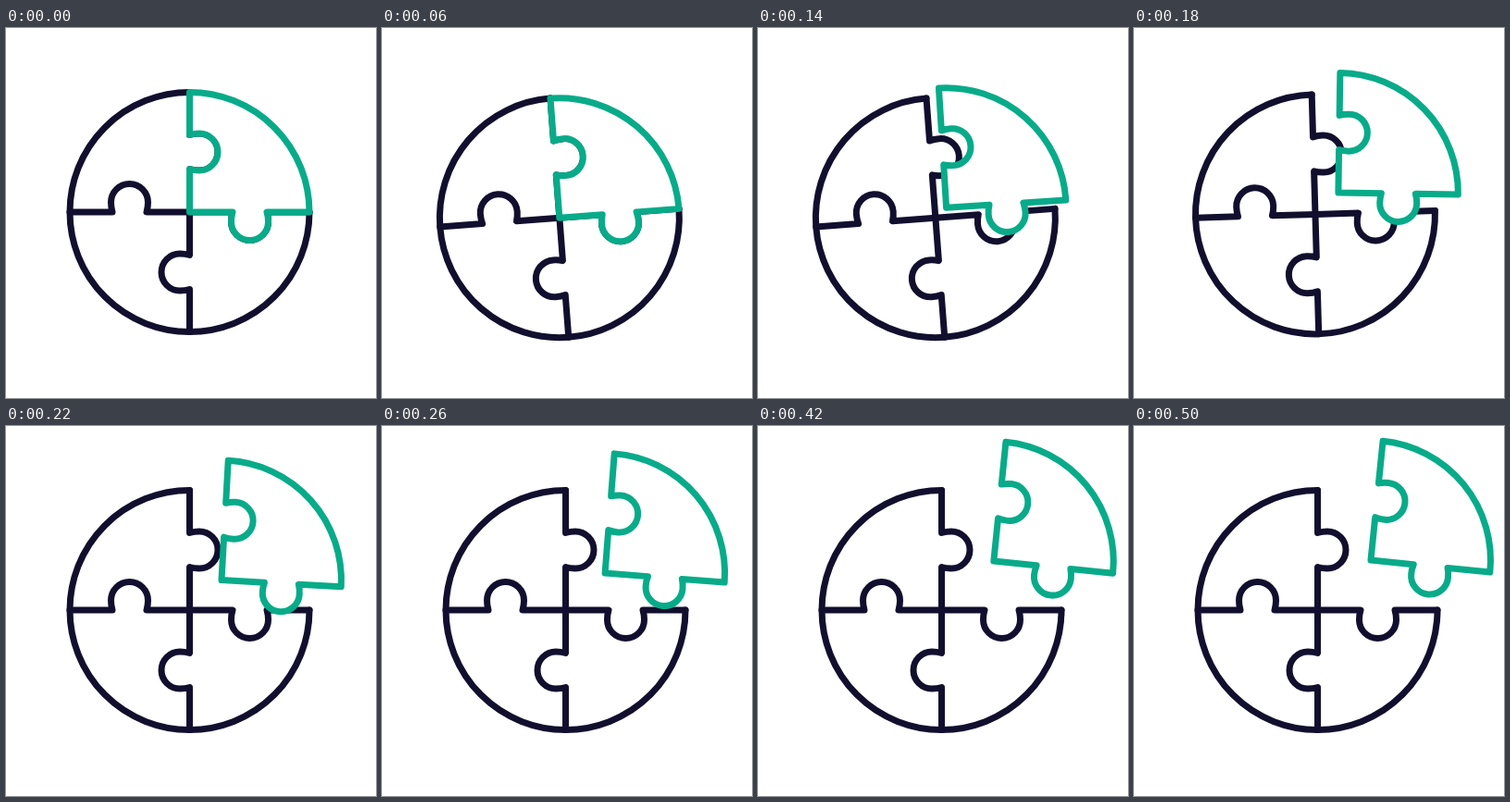
Recreate the animation shown at these times as an HTML page. Size 400x400 px, loop 8 s.

```html
<!DOCTYPE html>
<html lang="en">
<head>
<meta charset="utf-8">
<title>Puzzle circle</title>
<style>
  html, body { margin: 0; height: 100%; overflow: hidden; background: #fff; }
  svg { display: block; width: 100%; height: 100%; }
  path { stroke-width: 7; stroke-linecap: round; stroke-linejoin: round; }
  #base path { fill: none; stroke: #120f2e; }
  #piece { fill: #fff; stroke: #08ab89; }
</style>
</head>
<body>
<svg viewBox="0 0 400 400">
  <g id="base">
    <path d="M129.5 0A129.5 129.5 0 1 1 0 -129.5"/>
    <path class="spoke"/>
    <path class="spoke" transform="rotate(90)"/>
    <path class="spoke" transform="rotate(180)"/>
    <path class="spoke" transform="rotate(270)"/>
  </g>
  <path id="piece"/>
</svg>
<script>
const LOOP = 8000, STEP = 20;
const RECOIL = 200, RELEASE = 100, FLIGHT = 400, TURN = 300;
const CENTER = { x: 198.5, y: 199 };
const PULLED = { x: -8.2, y: 7.7, angle: -5.4 };
const FREE = { x: 57.5, y: -54, angle: 5.8 };

// Spoke from the rim to the hub, then the same spoke turned 90° from hub to rim.
const spoke = 'M0 -129.5V-83.5Q5 -85 10.5 -85A20 20 0 0 1 10.5 -45Q5 -45 0 -46.5V0';
const turnedSpoke = 'H46.5Q45 5 45 10.5A20 20 0 0 0 85 10.5Q85 5 83.5 0H129.5';
const base = document.getElementById('base');
const piece = document.getElementById('piece');
document.querySelectorAll('.spoke').forEach(p => p.setAttribute('d', spoke));
piece.setAttribute('d', spoke + turnedSpoke + 'A129.5 129.5 0 0 0 0 -129.5Z');

// Cubic Bézier easing, solved for x = u by bisection.
function bezier(x1, y1, x2, y2) {
  const curve = (s, a, b) => 3 * (1 - s) ** 2 * s * a + 3 * (1 - s) * s * s * b + s ** 3;
  return u => {
    if (u >= 1) return 1;
    let lo = 0, hi = 1;
    for (let i = 0; i < 24; i++) {
      const s = (lo + hi) / 2;
      if (curve(s, x1, x2) < u) lo = s; else hi = s;
    }
    return curve(lo, y1, y2);
  };
}
const easeMove = bezier(0.167, 0.167, 0.16, 1);
const easeTurn = bezier(0.26, 0, 0.05, 1);

const mix = (a, b, k) => a + (b - a) * k;

function place(node, { x, y, angle }) {
  node.setAttribute('transform',
    `translate(${CENTER.x + x} ${CENTER.y + y}) rotate(${angle})`);
}

function basePose(t) {
  const pull = t < RECOIL ? Math.sin(Math.PI * t / RECOIL) : 0;
  return { x: PULLED.x * pull, y: PULLED.y * pull, angle: PULLED.angle * pull };
}

function piecePose(t) {
  if (t <= RELEASE) return basePose(t);
  const move = easeMove((t - RELEASE) / FLIGHT);
  const turn = easeTurn((t - RELEASE) / TURN);
  return {
    x: mix(PULLED.x, FREE.x, move),
    y: mix(PULLED.y, FREE.y, move),
    angle: mix(PULLED.angle, FREE.angle, turn)
  };
}

function draw() {
  const t = Math.floor(performance.now() % LOOP / STEP) * STEP;
  place(base, basePose(t));
  place(piece, piecePose(t));
  requestAnimationFrame(draw);
}
draw();
</script>
</body>
</html>
```
